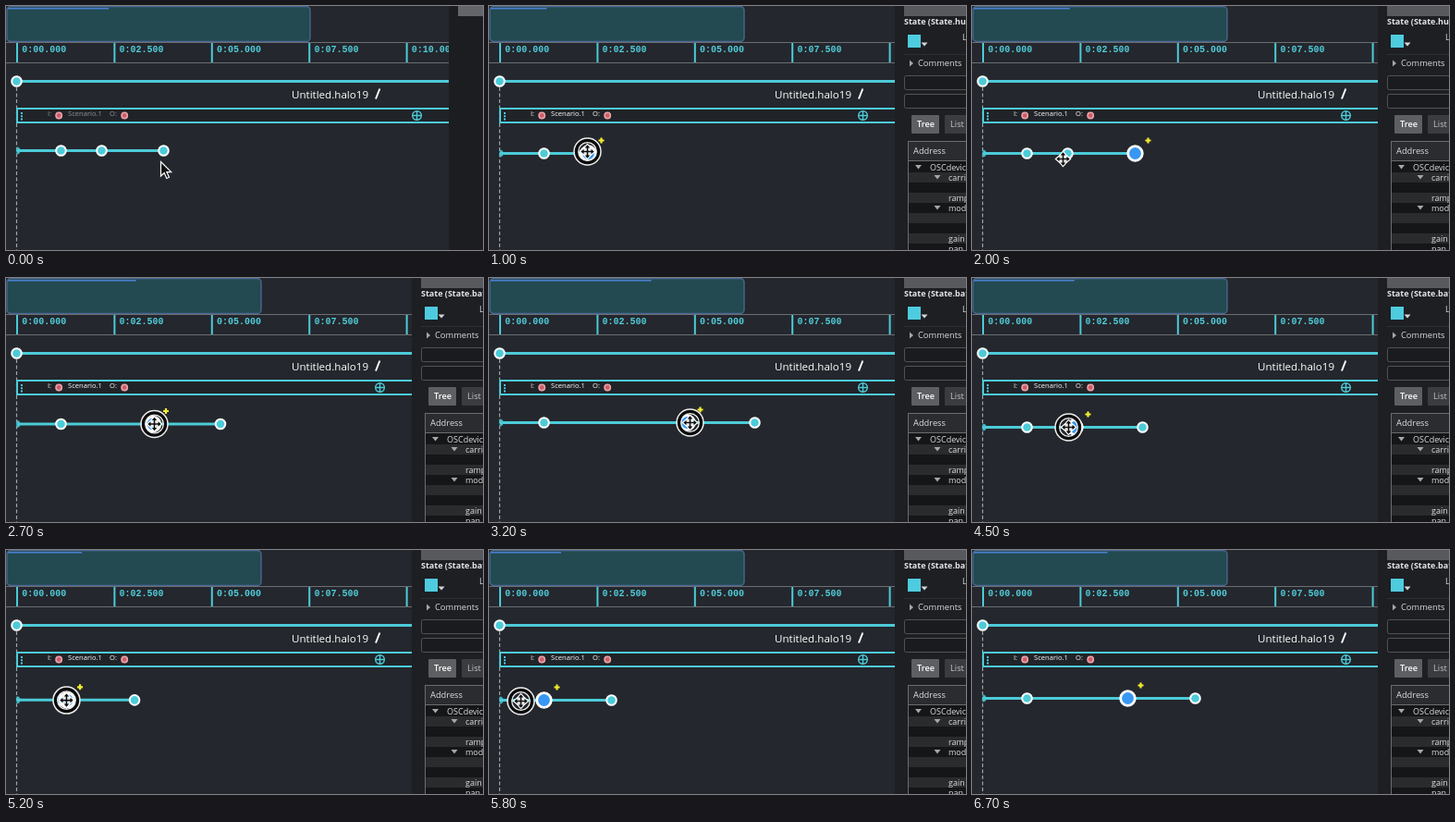
An HTML page for the animation above (6900 ms loop, 516 by 264 pixels).

```html
<!DOCTYPE html>
<html lang="en">
<head>
<meta charset="utf-8">
<title>Timeline drag</title>
<style>
html, body { margin: 0; width: 100%; height: 100%; overflow: hidden; background: #24272d; }
svg { display: block; width: 516px; height: 264px; }
text { font-family: "Open Sans", "Noto Sans", sans-serif; font-weight: 500; white-space: pre; }
.tick { font: bold 10px "Liberation Mono", monospace; fill: #50cdda; }
.cyan { stroke: #4ccbd8; fill: none; }
.node { fill: #4ccbd8; stroke: #fff; stroke-width: 2; }
.port { fill: #c8606c; stroke: #efa3aa; stroke-width: 1.5; }
</style>
</head>
<body>
<svg viewBox="0 0 516 264">
  <defs><clipPath id="clip"><rect id="clipBox" width="479" height="264"/></clipPath></defs>
  <rect width="516" height="264" fill="#1c1d21"/>
  <g clip-path="url(#clip)">
    <rect width="479" height="264" fill="#24272d"/>
    <rect id="view" x="1" y="0.5" width="328" height="38" rx="4" fill="#224a50" stroke="#4c6896" stroke-width="1.3"/>
    <path id="mini" stroke="#4d7fd0" stroke-width="1.5"/>
    <path d="M0 39.5H479M0 61.5H479" stroke="#6b6e72"/>
    <g id="ruler"></g>
    <path d="M11.5 88V264" stroke="#a0a2a4" stroke-width="1.2" stroke-dasharray="4 2.5"/>
    <path class="cyan" d="M11 81.5H479" stroke-width="3"/>
    <circle class="node" cx="11.5" cy="81.5" r="5.3"/>
    <text x="309" y="100" font-size="11.6" fill="#fff">Untitled.halo19</text>
    <path d="M400 100.5L404.3 89.5" stroke="#fff" stroke-width="2"/>
    <rect x="12" y="111" width="490" height="15" class="cyan" stroke-width="2" style="fill:#202328"/>
    <path d="M17 115V123.5" stroke="#4ccbd8" stroke-width="2" stroke-dasharray="2 1.2"/>
    <g id="ports" font-size="7.6">
      <text x="45" y="119">I:</text>
      <text x="67" y="119">Scenario.1</text>
      <text x="112" y="119">O:</text>
    </g>
    <circle class="port" cx="57.2" cy="118.5" r="3.2"/>
    <circle class="port" cx="128.2" cy="118.5" r="3.2"/>
    <g id="globe" class="cyan" stroke-width="1.4">
      <circle r="4.8"/><path d="M-5 0H5M0 -5V5"/>
    </g>
    <g id="track">
      <path d="M11 -4A4 4 0 0 1 11 4Z" fill="#3fb3c0"/>
      <path id="line" class="cyan" stroke-width="3"/>
      <circle class="node" cx="59" r="5.3"/>
      <circle id="second" class="node" r="5.3"/>
      <circle id="third" class="node" r="5.3"/>
      <g id="picked">
        <circle r="7.8" fill="#3897f2" stroke="#fff" stroke-width="2.8"/>
        <path d="M14 -17V-11M11 -14H17" stroke="#f5ee2e" stroke-width="2.2"/>
      </g>
    </g>
  </g>
  <rect id="stub" x="489" y="0" width="27" height="11" fill="#646568"/>
  <g id="panel"></g>
  <path id="arrow" d="M0 0V15.5L3.7 12L6.3 18L9 16.8L6.4 11.2H11.2Z" fill="#111" stroke="#fff" stroke-width="1.2"/>
  <g id="hand">
    <g id="ring" fill="none">
      <circle r="12" stroke="#0b0b0c" stroke-width="4"/>
      <circle r="14.5" stroke="#ececec" stroke-width="1.5"/>
      <circle r="9.8" stroke="#ececec" stroke-width="1.3"/>
    </g>
    <path id="cross" fill="#0c0c0c" stroke="#fff" stroke-width="2.4" paint-order="stroke"/>
  </g>
</svg>
<script>
const LOOP = 6900, STEP = 100;
const OPEN = 300, SWITCH = 2200, GONE = 6600;
const GAP = 73;
const $ = id => document.getElementById(id);
const set = (id, attrs) => {
  for (const k in attrs) $(id).setAttribute(k, attrs[k]);
};
const show = (id, on) => set(id, { display: on ? "inline" : "none" });
const move = (id, x, y) => set(id, { transform: `translate(${x} ${y})` });

// time, picked node x, track y
const drag = [
  [0, 170, 156], [300, 170, 156], [1000, 107, 159], [1600, 176, 159], [2100, 176, 159],
  [2200, 103, 159], [3200, 214, 156], [4500, 111, 161], [5400, 59, 162],
  [5800, 59, 162], [6500, 168, 160], [6900, 168, 160]
];
// time, pointer x, pointer y
const pointer = [
  [0, 167, 168], [200, 170, 158], [300, 170, 157], [1000, 106, 157], [1600, 175, 159],
  [1700, 175, 159], [2000, 98, 165], [2200, 103, 159], [3200, 217, 156],
  [4500, 104, 161], [5800, 34, 163], [6500, 168, 160], [6900, 168, 160]
];

function at(keys, t) {
  let i = 0;
  while (i < keys.length - 2 && t >= keys[i + 1][0]) i++;
  const [a, b] = [keys[i], keys[i + 1]];
  const u = (t - a[0]) / (b[0] - a[0]);
  const e = u * u * (3 - 2 * u);
  return [1, 2].map(k => a[k] + (b[k] - a[k]) * e);
}

function buildRuler() {
  const labels = ["0:00.000", "0:02.500", "0:05.000", "0:07.500", "0:10.000"];
  $("ruler").innerHTML = labels.map((s, i) => {
    const x = 12 + i * 105.4;
    return `<path class="cyan" stroke-width="2" d="M${x} 40V61"/>
      <text class="tick" x="${x + 5.2}" y="50">${s}</text>`;
  }).join("");
}

function buildPanel() {
  const text = (x, y, s, size = 9, fill = "#dcddde", more = "") =>
    `<text x="${x}" y="${y}" font-size="${size}" fill="${fill}" ${more}>${s}</text>`;
  const box = (x, y, w, h, fill, more = "") =>
    `<rect x="${x}" y="${y}" width="${w}" height="${h}" fill="${fill}" ${more}/>`;
  const fold = (x, y) => `<path d="M${x - 3.5} ${y - 2}h7l-3.5 4.5z" fill="#a5a7aa"/>`;
  const edge = 'stroke="#505256" rx="2"';

  let out = box(439, 0, 77, 264, "#1d1f23") + box(449, 0, 70, 11, "#58595c")
    + text(449, 20, "", 9, "#e4e5e6", 'id="title" style="font-weight:700"')
    + box(453, 31, 14, 14, "#4fcbe0")
    + '<path d="M467.5 39.5h7l-3.5 4z" fill="#d5d6d8"/>'
    + text(512, 37, "L", 9)
    + '<path d="M449 52.5H516" stroke="#3c3e42" stroke-dasharray="1 1"/>'
    + '<path d="M455 58.5v7l4-3.5z" fill="#a5a7aa"/>'
    + text(464, 65, "Comments", 9.3)
    + box(449.5, 75.5, 75, 15, "#1a1b1e", edge)
    + box(449.5, 95.5, 75, 15, "#1a1b1e", edge)
    + box(457, 118, 30, 20, "#5d5f62", 'rx="1"')
    + text(463, 131, "Tree", 9.2, "#fff", 'style="font-weight:600"')
    + box(493, 118, 30, 20, "#3a3c40", 'rx="1"') + text(499, 131, "List", 9.3, "#c2c4c6")
    + box(453.5, 146.5, 70, 130, "#151618", 'stroke="#6a6c6f"')
    + box(454, 147, 62, 20, "#2a2c2f") + text(459, 160, "Address", 9.3)
    + '<path d="M454 167.5H516" stroke="#6a6c6f"/>';

  const rows = ["OSCdevice", "carrier", "", "ramp", "mod", "", "", "gain", "pan"];
  rows.forEach((s, i) => {
    const y = 169 + i * 11;
    if (i % 2) out += box(454, y, 62, 11, "#2a2b2d");
    out += text(i ? 497 : 477, y + 9, s, 9);
    if (i === 0) out += fold(464.5, y + 5);
    if (s === "carrier" || s === "mod") out += fold(485, y + 5);
  });
  $("panel").innerHTML = out;
}

// one arm of the move pointer, turned four times
function buildCross() {
  let arm = [[0.8, -0.8], [0.8, -4], [2.8, -4], [0, -7.2], [-2.8, -4], [-0.8, -4]];
  const outline = [];
  for (let i = 0; i < 4; i++) {
    outline.push(...arm.map(p => p.join(" ")));
    arm = arm.map(([x, y]) => [y, -x]);
  }
  set("cross", { d: `M${outline.join("L")}Z` });
}

function draw(t) {
  const open = t >= OPEN, swapped = t >= SWITCH;
  const [x, y] = at(drag, t), [px, py] = at(pointer, t);
  const end = swapped ? x + GAP : x;
  const width = open ? 439 : 479, viewW = open ? 275 : 328;

  set("clipBox", { width });
  set("view", { width: viewW });
  set("mini", { d: `M2 2.8H${2 + (end - 11) * (viewW + 1) / width}` });
  set("ports", { fill: open ? "#fff" : "#909396" });
  move("globe", open ? 404.5 : 444.5, 118.5);
  show("panel", open);
  show("stub", !open);
  $("title").textContent = swapped ? "State (State.batch" : "State (State.hue";

  move("track", 0.5, y + 0.5);
  set("line", { d: `M11 0H${end}` });
  set("second", { cx: swapped ? x : 103 });
  set("third", { cx: end });
  move("picked", x, 0);
  show("picked", open);

  const pressed = (open && t < 1700) || (swapped && t < 6500);
  show("arrow", t < 200);
  show("hand", t >= 200 && t < GONE);
  show("ring", pressed);
  move("arrow", px + 0.5, py + 0.5);
  move("hand", px + 0.5, py + 0.5);
}

buildRuler();
buildPanel();
buildCross();

const start = performance.now();
function frame() {
  const t = (performance.now() - start) % LOOP;
  draw(Math.min(6700, Math.floor(t / STEP) * STEP));
  requestAnimationFrame(frame);
}
frame();
</script>
</body>
</html>
```
